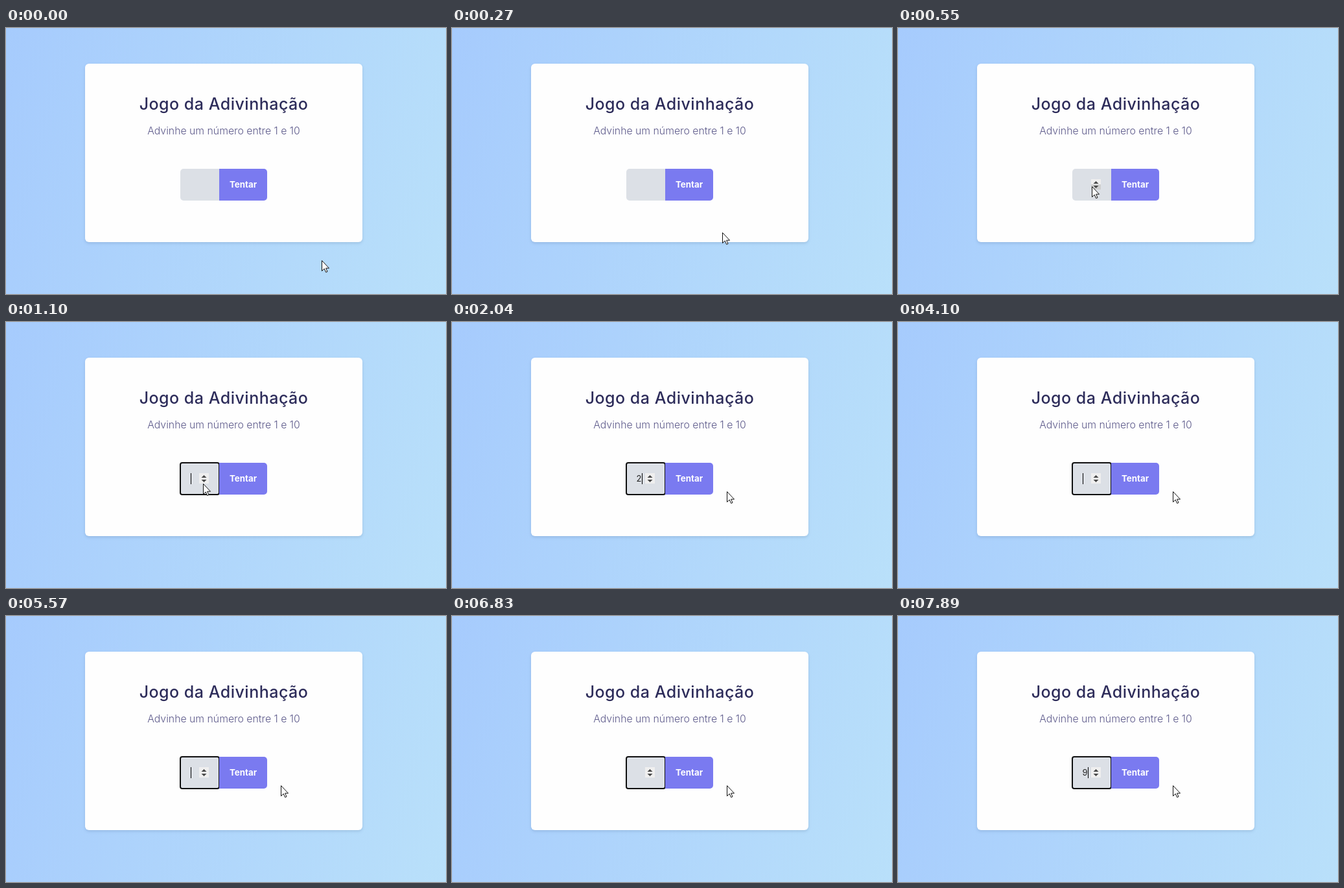
Write an HTML page that moves like this. It is 679x410 px and loops after 8 s.

```html
<!DOCTYPE html>
<html lang="pt">
<head>
<meta charset="utf-8">
<title>Jogo da Adivinhação</title>
<style>
  html, body { margin: 0; width: 100%; height: 100%; overflow: hidden; }
  body { background: linear-gradient(105deg, #a6cbfd, #b9e0fa); }
  svg { display: block; width: 679px; height: 410px; font-family: Inter, "Open Sans", sans-serif; }
  .card { fill: #fefefe; filter: drop-shadow(0 2px 2px rgba(40, 70, 110, .17)); }
  .middle { text-anchor: middle; }
  .title { font-size: 25px; font-weight: 500; letter-spacing: .5px; fill: #2d2c5a; }
  .hint { font-size: 15.8px; font-weight: 300; fill: #5c598a; }
  .label { font-size: 13.3px; font-weight: 700; fill: #fff; }
  .digit { font-size: 13px; fill: #222; }
</style>
</head>
<body>
<svg viewBox="0 0 679 410">
  <rect class="card" x="122" y="55" width="428" height="275" rx="6"/>
  <text class="middle title" x="336" y="126">Jogo da Adivinhação</text>
  <text class="middle hint" x="336" y="164">Advinhe um número entre 1 e 10</text>

  <path d="M329 217H274a5 5 0 0 0 -5 5V261a5 5 0 0 0 5 5H329Z" fill="#dce0e6"/>
  <rect id="ring" x="269" y="217" width="60" height="49" rx="3" fill="none" stroke="#101010" stroke-width="2"/>
  <path d="M329 217H398a5 5 0 0 1 5 5V261a5 5 0 0 1 -5 5H329Z" fill="#7a7af0"/>
  <text class="middle label" x="366" y="246">Tentar</text>

  <g id="spinner">
    <rect x="298" y="233" width="15" height="16" fill="#efefef"/>
    <rect id="down" x="298" y="241" width="15" height="8" fill="#cfcfcf"/>
    <path d="M301.5 240l4 -4 4 4ZM301.5 243l4 4 4 -4Z" fill="#484848"/>
  </g>
  <text id="digit" class="digit" x="284.5" y="246"></text>
  <rect id="caret" y="233" width="1" height="17" fill="#000"/>

  <path id="arrow" d="M.5 .5V16.5L4.2 13 6.7 18.5 9 17.5 6.6 12.2H11.5Z" fill="#fff" stroke="#111" stroke-linejoin="round"/>
  <path id="beam" d="M-3 -7.5H-1L0 -7 1 -7.5H3M0 -7V7M-3 7.5H-1L0 7 1 7.5H3" fill="none" stroke="#111"/>
</svg>
<script>
const LOOP = 8000, TICK = 68.5, BLINK = 530, HOLD = 200, FOCUS = 1040, CARET_START = 1100;
const $ = id => document.getElementById(id);
const show = (id, on) => $(id).setAttribute("visibility", on ? "visible" : "hidden");
const within = (v, low, high) => v >= low && v < high;

// Pointer turns: tick, x, y
const turns = [[0, 487, 358], [8, 299, 244], [13, 292, 245], [15, 292, 245], [16, 304, 249], [18, 400, 216], [19, 424, 261]];

// One digit per key press; each guess is cleared after HOLD
const guesses = "2461379";
const presses = [2040, 3040, 4370, 5100, 6300, 7230, 7890];

function pointerAt(tick) {
  const next = turns.findIndex(turn => turn[0] > tick);
  if (next < 0) return turns.at(-1).slice(1);
  const from = turns[next - 1], to = turns[next];
  const k = (tick - from[0]) / (to[0] - from[0]);
  return [1, 2].map(i => Math.round(from[i] + (to[i] - from[i]) * k));
}

function drawPointer(t, focused) {
  const [x, y] = pointerAt(Math.floor(t / TICK));
  const inField = within(x, 269, 329) && within(y, 217, 266);
  const inSpinner = inField && within(x, 298, 313);
  const isBeam = inField && !inSpinner;
  for (const id of ["arrow", "beam"]) $(id).setAttribute("transform", `translate(${x} ${y})`);
  show("beam", isBeam);
  show("arrow", !isBeam);
  show("spinner", inField || focused);
  show("down", inSpinner && within(y, 241, 249));
}

function drawField(t, focused) {
  const last = presses.findLastIndex(press => t >= press);
  const age = t - (presses[last] ?? CARET_START);
  const digit = $("digit");
  digit.textContent = last >= 0 && age < HOLD ? guesses[last] : "";
  $("caret").setAttribute("x", 285 + Math.round(digit.getComputedTextLength()));
  show("ring", focused);
  show("caret", focused && Math.floor(age / BLINK) % 2 === 0);
}

function frame(now) {
  const t = now % LOOP, focused = t >= FOCUS;
  drawPointer(t, focused);
  drawField(t, focused);
  requestAnimationFrame(frame);
}
requestAnimationFrame(frame);
</script>
</body>
</html>
```
